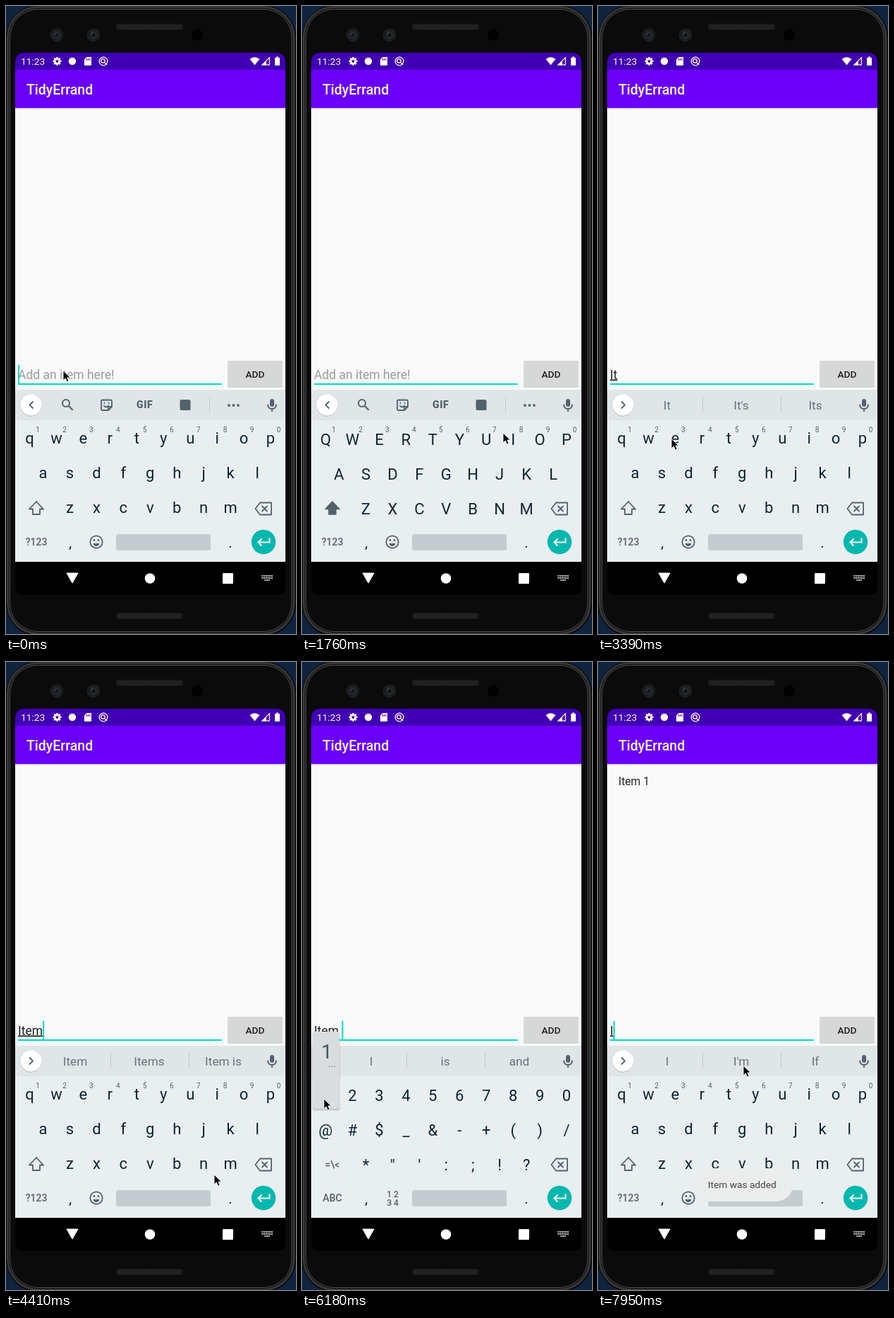
Recreate the animation shown at these times as an HTML page. Size 411x887 px, loop 8 s.

```html
<!DOCTYPE html>
<html lang="en">
<head>
<meta charset="utf-8">
<title>Todo list demo</title>
<style>
  html, body { margin: 0; width: 100%; height: 100%; overflow: hidden; background: #10233f; }
  svg { display: block; width: 411px; height: 887px; }
  text { font-family: Roboto, Arial, sans-serif; white-space: pre; }
  .mid { text-anchor: middle; }
  .key { font-size: 22px; fill: #0c2631; text-anchor: middle; }
  .line { fill: none; stroke: #52636b; stroke-width: 1.8; stroke-linejoin: round; }
</style>
</head>
<body>
<svg id="stage" viewBox="0 0 411 887" xmlns="http://www.w3.org/2000/svg"></svg>
<script>
const LOOP = 8000, FIRST = 289, STEP = 147.1;
const INK = '#52636b', TEAL = '#03dac5';

const rect = (x, y, w, h, fill, r = 0, more = '') =>
  `<rect x="${x}" y="${y}" width="${w}" height="${h}" rx="${r}" fill="${fill}" ${more}/>`;
const circle = (x, y, r, fill, more = '') => `<circle cx="${x}" cy="${y}" r="${r}" fill="${fill}" ${more}/>`;
const path = (d, more = 'class="line"') => `<path d="${d}" ${more}/>`;
const text = (x, y, size, fill, str, more = '') =>
  `<text x="${x}" y="${y}" font-size="${size}" fill="${fill}" ${more}>${str.replace(/&/g, '&amp;').replace(/</g, '&lt;')}</text>`;
const label = (x, y, size, fill, str, weight = 400) =>
  text(x, y, size, fill, str, `class="mid" font-weight="${weight}"`);
const group = (id, body, more = '') => `<g id="${id}" ${more}>${body}</g>`;
const at = (x, y, body) => `<g transform="translate(${x} ${y})">${body}</g>`;

const column = i => 33.5 + 37.95 * i;
const row = (str, first, y) => [...str].map((c, i) =>
  `<text class="key" x="${column(first + i)}" y="${y}">${c === '&' ? '&amp;' : c}</text>`).join('');

function phone() {
  const speaker = y => rect(156, y, 95, 9, '#1b1b1b', 4) +
    path(`M159 ${y + 3}h89M160 ${y + 6}h89`, 'stroke="#353535" stroke-width="1.5" stroke-dasharray="1.2 1.4"');
  const lens = x => circle(x, 41, 9.5, '#1c1d20') + circle(x, 41, 5.5, '#25282d') +
    circle(x, 41, 2.5, '#11151b') + circle(x - 2, 39, 1, '#4a4d52');
  return rect(0, 0, 411, 887, '#10233f') +
    rect(0, -1, 411, 891, '#080808', 46) +
    rect(2.5, 1.5, 405.5, 885, 'none', 43, 'stroke="#383838" stroke-width="3"') +
    rect(5.5, 4.5, 399.5, 879, '#0b0b0b', 40, 'stroke="#555" stroke-width="1"') +
    speaker(25) + speaker(857) + lens(72) + lens(124) + circle(271, 41, 8, '#010101');
}

function statusBar() {
  const gear = Array.from({ length: 8 }, (_, i) =>
    rect(-1.3, -6, 2.6, 3, '#fff', .4, `transform="rotate(${i * 45})"`)).join('');
  return text(21, 83, 13.7, '#fff', '11:23') +
    at(72.5, 78, gear + circle(0, 0, 3.2, 'none', 'stroke="#fff" stroke-width="2.4"')) +
    circle(94, 78, 5.2, '#fff') +
    path('M114.5 72H121V84H111V75.5Z', 'fill="#fff"') +
    path('M114.5 74v3M116.7 74v3M118.9 74v3', 'stroke="#4000b4" stroke-width="1"') +
    circle(138, 78, 5.8, 'none', 'stroke="#fff" stroke-width="1.3"') +
    circle(137.5, 77.5, 2.7, 'none', 'stroke="#fff" stroke-width="1.3"') +
    path('M139 79l4 4', 'stroke="#fff" stroke-width="1.4"') +
    path('M345.5 75Q352.5 69.5 359.5 75L352.5 83.5Z', 'fill="#fff"') +
    path('M363 83.2H373.3V72.9Z', 'fill="none" stroke="#fff" stroke-width="1.2"') +
    path('M363 83.5L369 77.5V83.5Z', 'fill="#fff"') +
    rect(381, 73, 7, 11, '#fff', 1) + rect(383, 71.5, 3, 2, '#fff');
}

function appArea() {
  return group('page', rect(13, 90, 383, 700, '#fafafa') +
    rect(13, 144, 383, 3, 'url(#drop)') +
    rect(13, 66, 383, 24, '#4000b4') + rect(13, 90, 383, 54, '#6a00f8') +
    statusBar() +
    text(29, 124.5, 19.5, '#fff', 'TidyErrand', 'font-weight="500"') +
    group('item', text(29, 173.5, 15.6, '#212121', 'Item 1')) +
    text(17, 526.5, 17.5, '#9a9a9a', 'Add an item here!', 'id="hint"') +
    text(17, 526.5, 17.5, '#212121', '', 'id="field"') +
    rect(17, 533, 289, 2, TEAL) +
    rect(17, 507, 2, 26, TEAL, 0, 'id="caret"') +
    rect(314, 502, 78, 37, '#000', 2, 'opacity=".18"') +
    rect(314, 501, 78, 37, '#d6d7d7', 2, 'id="button"') +
    label(353, 524.5, 13.7, '#212121', 'ADD', 500), 'clip-path="url(#screen)"');
}

function strip() {
  const divider = x => rect(x, 552, 1, 22, '#c1c8cc');
  const tools = path('M38.5 558.5l-5 5 5 5') +
    circle(85, 561, 5, 'none', `stroke="${INK}" stroke-width="2"`) +
    path('M88.7 564.7l6 6', `stroke="${INK}" stroke-width="2.3"`) +
    path('M136.5 556.5h12q1.5 0 1.5 1.5v8l-5 5h-8.5q-1.5 0-1.5-1.5v-11.5q0-1.5 1.5-1.5ZM150 566h-5v5M138.5 564q3.5 5 7 0') +
    circle(139.5, 560.8, 1.1, INK) + circle(145.5, 560.8, 1.1, INK) +
    text(185, 568, 14, INK, 'GIF', 'font-weight="900" letter-spacing=".6"') +
    rect(246.5, 556, 15, 15, INK, 2) +
    divider(288) + [316, 322.5, 329].map(x => circle(x, 564, 1.9, INK)).join('');
  const words = path('M33 558.5l5 5-5 5') + divider(148) + divider(259) +
    [98, 203, 308].map(x => label(x, 570, 17.2, '#66747b', '')).join('');
  return rect(13, 542, 383, 43, '#e0e5e8') +
    circle(35.5, 564.5, 15.2, '#000', 'opacity=".13"') + circle(35.5, 563.5, 15, '#fff') +
    group('tools', tools) + group('words', words) +
    rect(374, 555, 6, 11, INK, 3) + path('M371 562.5q0 6.5 6 6.5t6-6.5M377 569v4');
}

function keyboard() {
  const arrow = 'M43 700L53 710.5H48V718H38V710.5H33Z';
  const hints = [...'1234567890'].map((c, i) => label(column(i) + 11.5, 602, 10, INK, c)).join('');
  const common = circle(128, 757, 8.7, 'none', `stroke="${INK}" stroke-width="1.8"`) +
    circle(125, 754.5, 1.4, INK) + circle(131, 754.5, 1.4, INK) +
    path('M123.3 759h9.4q-1.5 4-4.7 4t-4.7-4Z', `fill="${INK}"`) +
    label(43, 762, 14, INK, '?123', 500) + hints;
  const lower = row('qwertyuiop', 0, 617.5) + row('asdfghjkl', .5, 666.5) + row('zxcvbnm', 1.5, 716) + path(arrow);
  const upper = row('QWERTYUIOP', 0, 620) + row('ASDFGHJKL', .5, 669) + row('ZXCVBNM', 1.5, 718) +
    path(arrow, `fill="${INK}" stroke="${INK}" stroke-width="1.5" stroke-linejoin="round"`);
  const symbols = row('1234567890', 0, 620) + row('@#$_&-+()/', 0, 669) + row('*"\':;!?', 1.5, 718) +
    label(43, 714.5, 14, INK, '=\\<', 500) + label(43, 762, 14, INK, 'ABC', 500) +
    label(128.5, 755.5, 12, INK, '1 2', 500) + label(128.5, 767.5, 12, INK, '3 4', 500);
  return rect(13, 585, 383, 200, '#e9eef1') + strip() +
    group('letters', common) + group('lower', lower) + group('upper', upper) + group('symbols', symbols) +
    path('M360 701.5H376V718.5H360L353.5 710ZM362.5 706l8 8M370.5 706l-8 8') +
    label(91, 764.5, 21, '#0c2631', ',') + label(318, 764.5, 21, '#0c2631', '.') +
    rect(156, 746, 134, 23, '#c4cccf', 3) +
    circle(365, 757, 17.3, '#00b8ad') +
    path('M373.5 751.5V757.5H358M362.5 752.5L357.5 757.5L362.5 762.5', 'fill="none" stroke="#fff" stroke-width="2.2"');
}

function navBar() {
  const dots = [0, 1, 2].flatMap(r => Array.from({ length: r < 2 ? 6 : 3 }, (_, i) =>
    rect(362.5 + (r < 2 ? i * 2.7 : 4 + i * 2.7), 804 + r * 3, 1.7, 1.8, '#fff')));
  return path('M13 785H396V820Q396 832 384 832H25Q13 832 13 820Z', 'fill="#000"') +
    path('M86 801H102L94 815Z', 'fill="#fff" stroke="#fff" stroke-linejoin="round"') +
    circle(204, 808.5, 7.3, '#fff') + rect(307, 801, 15, 15, '#fff', 1) + dots.join('');
}

function overlays() {
  const popup = rect(-19.5, 1, 40, 111, '#000', 4, 'opacity=".10"') + rect(-18.5, 0, 38, 110, '#000', 4, 'opacity=".12"') +
    rect(-18.5, 0, 38, 109, '#d9dddf', 3) + label(1.5, 38, 28, '#45565e', '') +
    label(9.5, 50, 13, INK, '...');
  return group('popup', popup) +
    group('toast', rect(134, 715, 142, 47, '#ebeded', 23.5) + label(204.3, 743, 13.7, '#434343', 'Item was added')) +
    group('pointer', path('M0 0V14L3.3 10.9L5.5 16L8.1 14.9L5.9 10H10.3Z',
      'fill="#000" stroke="#fff" stroke-width=".9"'));
}

const stage = document.getElementById('stage');
stage.innerHTML = `<defs>
  <clipPath id="screen"><path d="M13 790V80Q13 66 27 66H382Q396 66 396 80V790Z"/></clipPath>
  <linearGradient id="drop" x2="0" y2="1"><stop stop-color="#cfcfcf"/><stop offset="1" stop-color="#fafafa"/></linearGradient>
  </defs>` + phone() + appArea() + keyboard() + navBar() + overlays();

const el = id => document.getElementById(id);
const show = (id, on) => el(id).style.display = on ? '' : 'none';

// Pointer route: step, x, y
const route = [
  [0, 81, 515], [1, 79, 522], [5, 45, 704], [7, 44, 711], [8, 90, 694], [9, 205, 640], [10, 285, 603],
  [11, 296, 606], [13, 296, 606], [16, 186, 609], [18, 186, 609], [21, 104, 611], [22, 104, 611],
  [23, 322, 713], [26, 322, 713], [28, 295, 724], [30, 225, 757], [32, 225, 757], [36, 42, 757],
  [37, 42, 757], [39, 33, 626], [40, 31, 617], [42, 31, 617], [45, 352, 520], [46, 352, 520],
  [47, 239, 558], [48, 215, 568], [49, 206, 570]
];
// Typed text: step, value, suggestions
const typed = [
  [-1, ''], [13, 'I', "I|I'm|If"], [17, 'It', "It|It's|Its"], [23, 'Ite', 'Item|Items|Iter'],
  [26, 'Item', 'Item|Items|Item is'], [31, 'Item ', 'I|is|and'], [41, 'Item 1', '1|1st|10'],
  [46, ''], [52, 'I', "I|I'm|If"]
];
const modes = [[-1, 'lower'], [6, 'upper'], [13, 'lower'], [37, 'symbols'], [46, 'lower']];
// Key previews: first step, end step, label, column, top
const presses = [[12, 13, 'I', 7, 522], [16, 17, 'T', 4, 522], [22, 23, 'E', 2, 522], [24, 26, 'M', 7.5, 620], [40, 41, '1', 0, 522]];

const latest = (table, k) => table.filter(r => r[0] <= k).pop();

function pointerAt(k) {
  const i = route.findIndex(r => r[0] > k);
  if (i === 0) return route[0].slice(1);
  if (i < 0) return route[route.length - 1].slice(1);
  const [a, x, y] = route[i - 1], [b, u, v] = route[i], p = (k - a) / (b - a);
  return [x + (u - x) * p, y + (v - y) * p];
}

let drawn = null;
function draw(k) {
  if (k === drawn) return;
  drawn = k;
  const [since, value, words] = latest(typed, k);
  const mode = latest(modes, k)[1];

  for (const m of ['lower', 'upper', 'symbols']) show(m, m === mode);
  show('letters', mode !== 'symbols');
  show('tools', !words);
  show('words', words);
  if (words) words.split('|').forEach((w, i) => el('words').querySelectorAll('text')[i].textContent = w);

  const field = el('field');
  show('hint', !value);
  field.textContent = value;
  field.style.textDecoration = value.includes(' ') ? 'none' : 'underline';
  const width = value ? field.getComputedTextLength() : 0;
  el('caret').setAttribute('x', 17 + width);
  const elapsed = since < 0 ? k * STEP + 500 : (k - since) * STEP;
  show('caret', k < 0 || Math.floor(elapsed / 500) % 2 === 0);

  const press = presses.find(p => k >= p[0] && k < p[1]);
  show('popup', press);
  if (press) {
    el('popup').setAttribute('transform', `translate(${column(press[3])} ${press[4]})`);
    el('popup').querySelector('text').textContent = press[2];
  }

  show('item', k >= 46);
  el('button').setAttribute('fill', k >= 45 && k < 48 ? '#c0c0c0' : '#d6d7d7');
  el('toast').setAttribute('opacity', k < 47 ? 0 : k === 47 ? .42 : k === 48 ? .85 : 1);
  el('pointer').setAttribute('transform', `translate(${pointerAt(k)})`);
}

const start = performance.now();
function tick() {
  const t = Math.max(0, performance.now() - start) % LOOP;
  draw(Math.max(-1, Math.floor((t - FIRST) / STEP)));
  requestAnimationFrame(tick);
}
tick();
</script>
</body>
</html>
```
